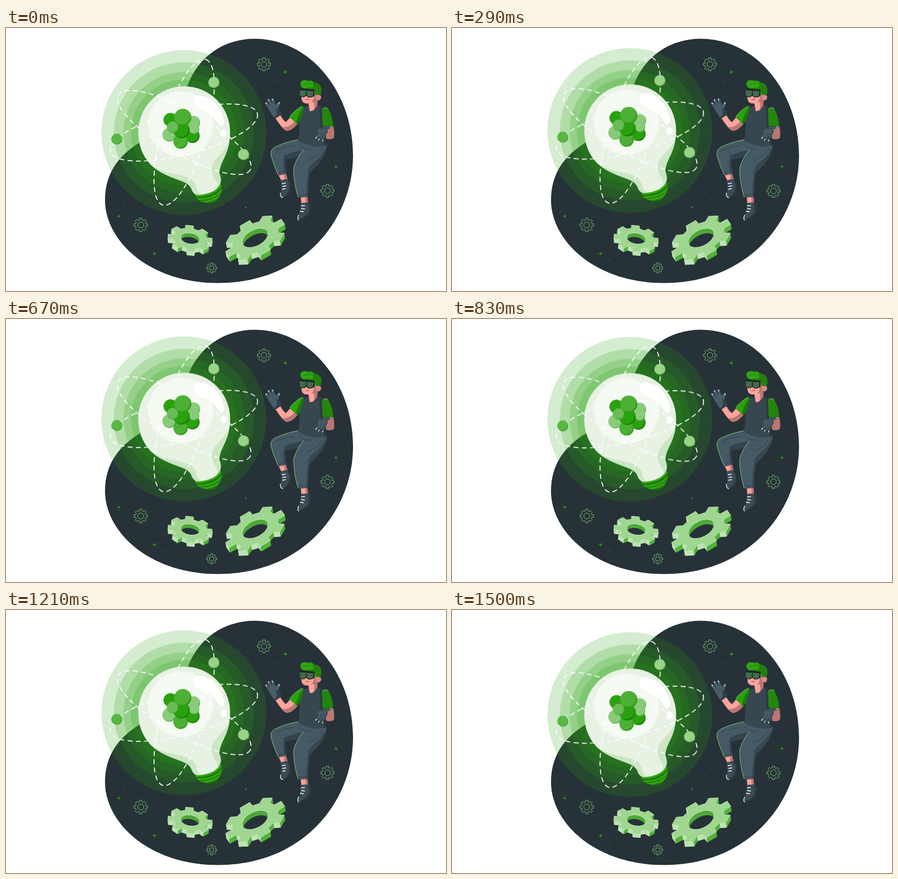
Recreate the animation shown at these times as an HTML page. Size 800 by 478 pixels, loop 1.54 s.

```html
<!DOCTYPE html>
<html lang="en">
<head>
<meta charset="utf-8">
<title>Floating idea</title>
<style>
  html, body { margin: 0; width: 100%; height: 100%; overflow: hidden; background: #fff; }
  svg { display: block; width: 800px; height: 478px; }
  #bulb { animation: float 1540ms linear infinite; }
  @keyframes float {
    0% { transform: translateY(0); }
    47% { transform: translateY(-9px); }
    98% { transform: translateY(.35px); }
    100% { transform: translateY(0); }
  }
  .glow { fill: #2aa10f; fill-opacity: .2; }
  .orbit { fill: none; stroke: #fff; stroke-width: 1.7; stroke-dasharray: 9 6; }
  .line { fill: none; stroke: #83cb70; stroke-width: .9; }
  .lace { fill: none; stroke: #fff; stroke-width: 1.3; stroke-linecap: round; }
  .fold { fill: none; stroke: #2c3b43; stroke-width: .8; }
  .rim { fill: none; stroke: #8fd57c; stroke-width: .9; }
</style>
</head>
<body>
<svg viewBox="0 0 800 478">
  <path fill="#263238" d="M452 19.5C553 19.5 631 117 631 231C631 351 538 463.5 386 463.5C258 463.5 180 385 180 313C180 255 215 225 245 207C290 180 320 140 330 105C350 50 398 19.5 452 19.5Z"/>
  <g id="sparks"></g>
  <g id="outlines"></g>
  <g id="gears"></g>

  <g id="man">
    <!-- far arm -->
    <path fill="#bb7673" d="M581 180L595 178Q598 190 596 200Q589 204 582 201Q580 195 585 188Z"/>
    <path fill="#23860b" d="M574 150Q578 142 586 147Q594 160 595 179L578 182Q570 165 574 150Z"/>
    <path class="rim" d="M575 148Q579 142 586 147"/>
    <!-- neck and head -->
    <path fill="#ffa39b" d="M549 132L566 128L566 143Q560 153 552 151Z"/>
    <path fill="#bb7673" d="M559 133L567 127L566 143Q563 150 559 151Q562 142 559 133Z"/>
    <path fill="#ffa39b" d="M537 117Q536 131 540 135Q546 139 553 136L564 130L564 115Z"/>
    <path fill="#bb7673" d="M555 136Q561 129 560 119L567 118L566 131Z"/>
    <ellipse fill="#d88a85" cx="568" cy="126" rx="5" ry="5.5"/>
    <path fill="none" stroke="#8c3d3d" stroke-width="1.2" d="M545 130.5Q548 129 551 130.5"/>
    <path fill="#23800c" d="M538 108Q534 102 538 97Q543 93 549 96Q556 94 561 99Q573 101 573.5 112Q574 120 570 122L562 121L561 113L540 110Z"/>
    <path fill="#2fa714" d="M538 108Q533 102 537 97Q542 93 548 96Q555 94 559 99Q556 103 560 106Q555 110 549 108Q544 111 538 108Z"/>
    <path fill="none" stroke="#1d7508" stroke-width=".8" d="M541 104Q548 99 552 103M549 97Q556 99 555 104"/>
    <path fill="#20292e" d="M535 109L561 112L561 123Q557 127 549 126L546 123L542 126Q535 126 533 121Q532 113 535 109Z"/>
    <path fill="#43555e" stroke="#3c9b2a" stroke-width="1.2" d="M535 114L545 115L544 121L541 124L535 122ZM548 115L558 116L557 123L551 124L548 121Z"/>
    <path stroke="#7b8d95" d="M538 121L541 116M551 122L554 117"/>

    <!-- legs -->
    <path fill="#455a64" d="M531 203Q505 208 488 217Q480 222 482 232Q487 250 495 268L511 264Q507 250 508 239L540 232L558 212Z"/>
    <path fill="#33444c" d="M506 232Q520 225 540 222L534 234L508 239Q507 250 511 264L507 265Q502 247 506 232Z"/>
    <path class="rim" d="M531 203Q505 208 488 217Q480 222 482 232Q487 250 495 267"/>
    <path fill="#455a64" d="M535 207Q542 215 541 221Q526 240 523 255Q523 280 531 308L549 306Q549 275 553 262Q575 243 582 222L583 212Z"/>
    <path fill="#37474f" d="M582 216Q576 231 560 244Q549 251 549 262Q546 285 546 307L549 306Q549 275 553 262Q575 243 582 222Z"/>
    <path class="rim" d="M541 221Q526 240 523 255Q523 280 531 307"/>
    <path class="fold" d="M531 212Q542 222 556 220M576 219Q568 234 548 241M494 264L510 260M530 304L549 302M491 222Q510 214 525 214"/>

    <!-- feet -->
    <path fill="#ffa39b" d="M496 268L509 265L512 275L501 278ZM536 308L548 307L549 318L537 319Z"/>
    <path fill="#bb7673" d="M505 266L509 265L512 275L507 277ZM544 307L548 307L549 318L545 319Z"/>
    <path fill="#2d3a42" d="M510 275L516 278Q519 291 515 302L506 307ZM547 318L554 317Q557 330 550 341L537 347Z"/>
    <path fill="#3c4c55" d="M499 277L511 274Q516 284 515 291Q512 303 505 307Q499 309 499 303Q502 290 499 277Z"/>
    <path fill="#3c4c55" d="M536 318L548 317Q552 328 549 336Q541 346 532 349Q529 345 533 338Q537 328 536 318Z"/>
    <path class="lace" d="M502 283L508 282M503 288L509 287M503 293L508 292M537 323L543 323M537 328L543 329M535 333L541 334"/>
    <path class="lace" d="M499 300Q498 307 503 308M532 340Q529 347 532 349"/>

    <!-- torso -->
    <path fill="#37474f" d="M534 151Q540 143 549 142L552 151Q560 152 565 142L573 141Q576 160 575 178Q578 200 582 213Q560 221 531 205Q534 190 534 170Z"/>
    <path fill="#2d3b43" d="M570 142L573 141Q576 160 575 178Q578 200 582 213L579 215Q571 190 571 165Z"/>

    <!-- near arm -->
    <path fill="#ffa39b" d="M518 161L531 173Q520 187 510 187Q502 183 490 164L498 157Q504 168 509 171Z"/>
    <path fill="#bb7673" d="M526 168L531 173Q520 187 510 187Q505 185 501 180Q516 182 526 168Z"/>
    <path fill="#2aa10f" d="M541 142Q528 146 515 162L530 175Q538 165 541 142Z"/>
    <path fill="#1d7807" d="M541 142Q532 154 527 172L530 175Q539 163 541 142Z"/>
    <path class="rim" d="M539 142Q527 147 516 161"/>
    <path fill="#475c66" d="M489 165Q482 156 476 145L471 137Q472 134 475 136L480 141L475 131Q477 128 480 131L485 138L482 129Q485 126 487 130L490 139L494 136Q497 132 498 136L495 147Q500 152 501 157Z"/>
    <path fill="#303e46" d="M495 147Q500 152 501 157L489 165L487 162Q497 157 490 146Z"/>
    <path class="lace" d="M472.5 136L474 138M477 130L478 132M484 129L485 131M496.5 135.5L496 138"/>

    <!-- far hand -->
    <path fill="#455a64" stroke="#26333a" stroke-width=".6" d="M591 178Q593 179 591 181Q584 183 583 188Q582 197 577 203L576 207L574 206L576 197L570 204L567 205L570 197L564 202L562 200L567 191Q565 187 567 183Q576 179 591 178Z"/>
    <path class="fold" d="M571 197L575 189M577 198L579 190M570 184L584 182"/>
    <path class="lace" d="M563 200.5L564.5 198.5M568 204L569 202M575.5 205.5L576 203.5M590 179.5L591 179.500"/>
  </g>

  <g id="bulb">
    <g class="glow">
      <circle cx="323.5" cy="190" r="150"/>
      <circle cx="323.5" cy="190" r="127.5"/>
      <circle cx="323.5" cy="190" r="110"/>
      <circle cx="323.5" cy="190" r="96.5"/>
    </g>
    <clipPath id="screw"><path d="M344 301L390 281Q394 290 391 301L386 309L383 315Q372 321 362 317Q349 316 345 306Z"/></clipPath>
    <g clip-path="url(#screw)">
      <path fill="#1b7006" d="M340 275h60v50h-60Z"/>
      <g fill="none" stroke="#30a512" stroke-width="4">
        <path d="M343 305Q377 306 392 285"/>
        <path d="M343 311Q380 313 395 291"/>
        <path d="M345 316Q378 318 394 300"/>
      </g>
    </g>
    <path fill="#e7f2e3" d="M324 106A83.5 83.5 0 0 1 407.5 189.5C407.5 230 388 242 388 264Q391 272 390.5 279Q389 289 378 296Q363 304 346 303Q340 301 337 292C331 276 302 277 272 256C251 240 240.5 216 240.5 189.5A83.5 83.5 0 0 1 324 106Z"/>
    <path fill="#cbe6c4" d="M257 242C282 269 318 262 336 275Q347 283 346 291Q348 300 356 303Q349 304 346 303Q340 301 337 292C331 276 302 277 272 256Q263 249 257 242Z"/>
    <path fill="#cbe6c4" d="M406 205C400 226 374 236 374 257Q376 272 383 279Q386 287 383 292Q389 287 390.5 279Q391 272 388 264C388 244 404 232 406 205Z"/>
    <circle fill="#f4f9f2" cx="317.5" cy="174.5" r="59.5"/>
    <path fill="#fff" d="M341 134Q340 122 352 122.500Q376 126 388 147Q397 163 397 173Q394 182 387 176Q378 159 361 151Q344 146 341 134Z"/>
    <ellipse fill="#fff" cx="395.5" cy="191" rx="6" ry="7"/>
    <g class="orbit">
      <ellipse cx="324" cy="189.5" rx="138" ry="40" transform="rotate(-73.5 324 189.5)"/>
      <ellipse cx="324" cy="190" rx="138" ry="40" transform="rotate(29.5 324 190)"/>
      <ellipse cx="323.5" cy="190" rx="138" ry="40" transform="rotate(-14.5 323.5 190)"/>
    </g>
    <g id="balls"></g>
  </g>
</svg>
<script>
const fill = (id, list) => { document.getElementById(id).innerHTML = list.join(''); };
const xy = p => p[0].toFixed(2) + ' ' + p[1].toFixed(2);
const poly = pts => 'M' + pts.map(xy).join('L') + 'Z';
const rad = Math.PI / 180;

// Sphere: shaded disc with a lighter lens towards the upper left
function ball([x, y, r, light, shade]) {
  const d = r * .2, a = 50 * rad;
  const mx = x - Math.cos(a) * d / 2, my = y - Math.sin(a) * d / 2;
  const h = Math.sqrt(r * r - d * d / 4), px = -Math.sin(a) * h, py = Math.cos(a) * h;
  const arc = `A${r} ${r} 0 0 1 `;
  return `<circle cx="${x}" cy="${y}" r="${r}" fill="${shade}"/><path fill="${light}" d="M${xy([mx + px, my + py])}` +
    arc + xy([mx - px, my - py]) + arc + xy([mx + px, my + py]) + 'Z"/>';
}

const deep = ['#2aa10f', '#1c8003'], mid = ['#4cb034', '#2f9b17'], pale = ['#8acb7b', '#6cbb59'];
fill('balls', [
  [341, 172, 12, ...pale],
  [299, 167, 12.5, ...deep], [297, 194, 12.5, ...pale],
  [339, 196, 13, ...deep], [342, 183, 9.5, ...pale], [317.5, 206.5, 13, ...mid],
  [319, 185.5, 15, ...deep], [303, 180.5, 10.5, '#6abc57', '#4fae3a'],
  [321.5, 162.5, 15.5, ...mid],
  [378, 99, 10, '#98d388', '#80c86d'], [432, 230, 10, '#98d388', '#80c86d'],
  [201.5, 202, 10, '#58b843', '#45a92f']
].map(ball));

// Toothed wheel outline, squashed into an ellipse turned by tilt degrees
function wheel(cx, cy, a, b, tilt, phase, root = .77) {
  const c = Math.cos(tilt * rad), s = Math.sin(tilt * rad), pts = [];
  for (let i = 0; i < 8; i++)
    for (const [off, k] of [[-14, root], [-10, 1], [10, 1], [14, root]]) {
      const t = (phase + i * 45 + off) * rad, u = a * k * Math.cos(t), v = b * k * Math.sin(t);
      pts.push([cx + u * c - v * s, cy + u * s + v * c]);
    }
  return pts;
}

function solidGear(id, cx, cy, a, b, tilt, phase, hole, dx, dy) {
  const pts = wheel(cx, cy, a, b, tilt, phase), sides = [];
  pts.forEach((p, i) => {
    const q = pts[(i + 1) % pts.length], nx = q[1] - p[1], ny = p[0] - q[0];
    if (nx * dx + ny * dy <= 0) return;
    const color = nx > .35 * Math.hypot(nx, ny) ? '#4fb437' : '#bde4b1';
    const quad = poly([p, q, [q[0] + dx, q[1] + dy], [p[0] + dx, p[1] + dy]]);
    sides.push([p[1] + q[1], `<path fill="${color}" d="${quad}"/>`]);
  });
  sides.sort((m, n) => m[0] - n[0]);
  const oval = (x, y, color, extra = '') =>
    `<ellipse cx="${x}" cy="${y}" rx="${hole[0]}" ry="${hole[1]}" transform="rotate(${tilt} ${x} ${y})" fill="${color}" ${extra}/>`;
  return sides.map(e => e[1]).join('') +
    `<path fill="#9fd690" stroke="#cdecc4" stroke-width=".8" stroke-linejoin="round" d="${poly(pts)}"/>` +
    `<clipPath id="${id}">${oval(cx, cy, '#000')}</clipPath>` + oval(cx, cy, '#4da838') +
    `<g clip-path="url(#${id})">${oval(cx + dx, cy + dy, '#263238')}</g>` +
    oval(cx, cy, 'none', 'stroke="#d5f0cd" stroke-width=".8"');
}
fill('gears', [
  solidGear('h1', 335, 382.5, 41, 23.5, 10, -8, [17.5, 10], -1, 7.5),
  solidGear('h2', 453, 381.5, 59.5, 33, -28, -4, [25.5, 14.5], 1.5, 9)
]);

fill('outlines', [[469, 66, 12], [245, 358, 12.5], [584.5, 296, 12.2], [374, 436, 9.3]].map(([x, y, r]) =>
  `<path class="line" stroke-linejoin="round" d="${poly(wheel(x, y, r, r, 0, 0, .76))}"/>` +
  `<circle class="line" cx="${x}" cy="${y}" r="${r * .43}"/>`));

const bright = '#2aa10f', dim = '#23651f';
fill('sparks', [
  [508, 80, 9.5, bright], [600, 252, 8, bright], [205, 342, 8, bright], [270, 410, 8.5, bright],
  [436, 326, 6.5, '#278a17'], [437.5, 45, 4.5, dim], [493, 97, 5, dim], [592, 130, 4.5, dim],
  [605, 232, 4.5, dim], [459.5, 300, 4.5, dim], [461, 322, 4.5, dim], [542, 383, 5.5, dim],
  [214.5, 321, 5, dim], [285, 422, 5, dim]
].map(([x, y, r, color]) =>
  `<path fill="${color}" transform="translate(${x} ${y}) rotate(-14) scale(${r})" d="M0-1C0 0 0 0 1 0C0 0 0 0 0 1C0 0 0 0-1 0C0 0 0 0 0-1Z"/>`));
</script>
</body>
</html>
```
